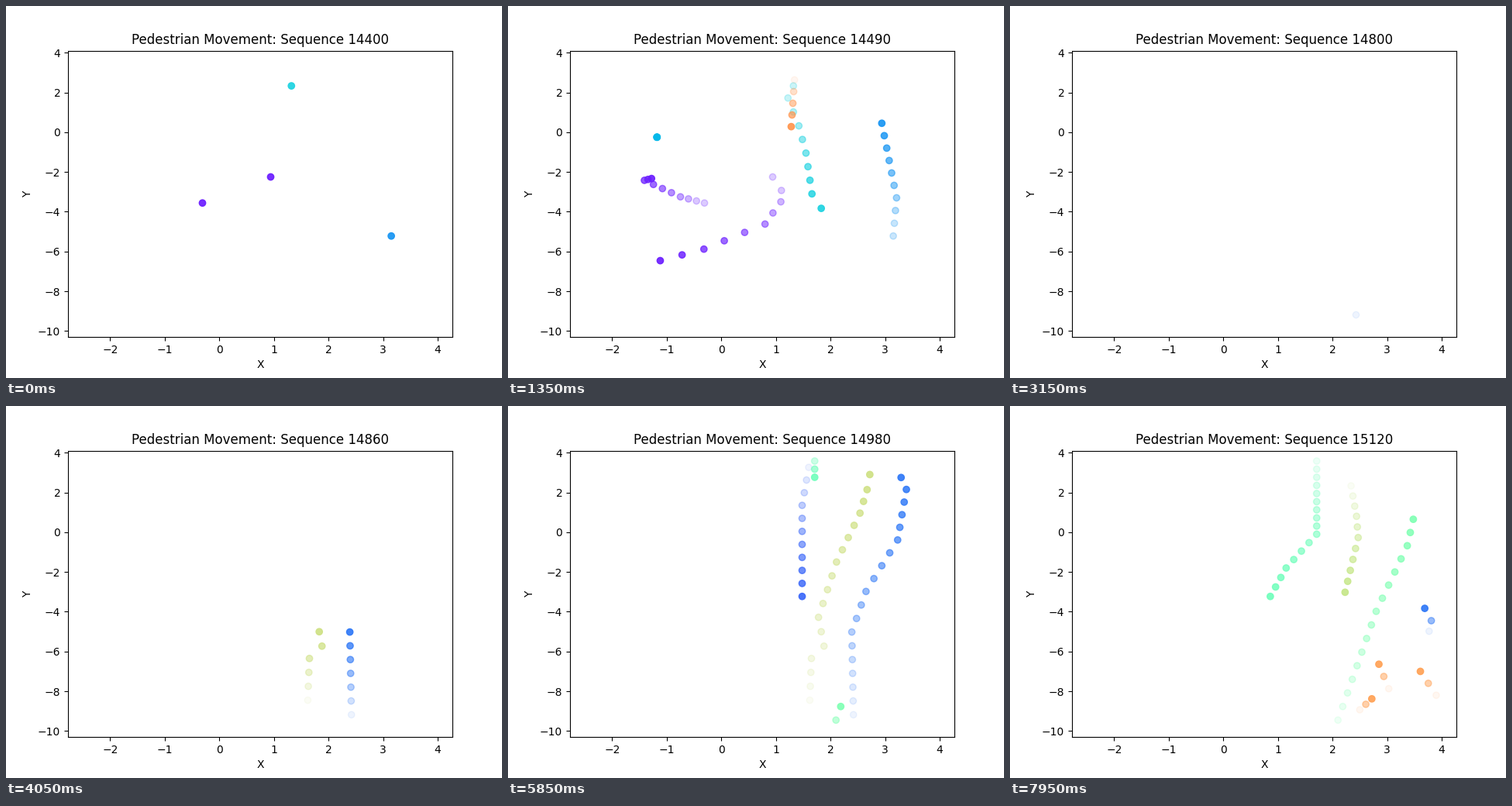
A matplotlib script for the animation above (8 s loop, 640 by 480 pixels).

```python
import numpy as np
import matplotlib.pyplot as plt
from matplotlib.animation import FuncAnimation

TICK_MS = 50
TICKS_PER_STEP = 3
TICKS = 160
GAP_STEP, GAP = 21, 190
OLDEST, NEWEST = .08, .92  # opacity along a trail

walkers = []


def walk(hue, *keys):
    """Add a walker who moves evenly between (step, x, y) key points."""
    key_steps, xs, ys = np.transpose(keys)
    steps = np.arange(key_steps[0], key_steps[-1] + 1)
    path = np.column_stack([np.interp(steps, key_steps, v) for v in (xs, ys)])
    walkers.append((plt.cm.rainbow(hue), steps, path))


# First group: already standing in place before the loop begins
walk(.04, (-1, -.31, -3.56), (0, -.31, -3.56), (3, -.75, -3.25),
     (7, -1.41, -2.42), (9, -1.28, -2.33), (12, -1.3, -2.25))
walk(.04, (-1, .94, -2.25), (0, .94, -2.25), (1, 1.1, -2.93), (2, 1.09, -3.5),
     (4, .8, -4.62), (7, -.32, -5.88), (9, -1.12, -6.46), (13, -2.7, -8.05))
walk(.2, (-1, 3.15, -5.22), (0, 3.15, -5.22), (3, 3.21, -3.3),
     (9, 2.94, .45), (14, 2.96, 3.6))
walk(.31, (-1, 1.32, 2.33), (0, 1.32, 2.33), (1, 1.22, 1.72), (3, 1.42, .32),
     (5, 1.55, -1.05), (8, 1.66, -3.1), (9, 1.83, -3.83), (17, 2.13, -9.1))
walk(.26, (5, -1.18, -.25), (20, -1.18, -.25))
walk(.8, (5, 1.34, 2.63), (9, 1.28, .28), (20, 1.49, -6.55))

# Second group
walk(.16, (21, 2.42, -9.18), (27, 2.39, -5.02), (30, 2.65, -2.98),
     (34, 3.23, -.39), (38, 3.39, 2.15), (41, 3.1, 3.95))
walk(.655, (22, 1.62, -8.45), (25, 1.65, -6.35), (26, 1.88, -5.73),
     (28, 1.78, -4.28), (32, 2.11, -1.5), (36, 2.54, .96),
     (38, 2.67, 2.14), (40, 2.77, 3.66))
walk(.135, (29, 1.6, 3.26), (32, 1.48, 1.35), (39, 1.48, -3.23), (41, 1.4, -4.5))

# Third group: the first two enter from outside the plot
walk(.47, (36, 1.71, 4.5), (37, 1.71, 3.58), (46, 1.71, -.1),
     (50, 1.15, -1.8), (53, .86, -3.23))
walk(.5, (37, 2.0, -10.7), (38, 2.1, -9.45), (46, 2.8, -3.98),
     (51, 3.37, -.68), (53, 3.48, .65))
walk(.64, (43, 2.34, 2.33), (46, 2.44, .8), (48, 2.47, -.27), (53, 2.23, -3.02))

# Late arrivals
walk(.78, (51, 3.03, -7.87), (53, 2.85, -6.64))
walk(.78, (51, 2.5, -8.93), (53, 2.72, -8.38))
walk(.78, (51, 3.9, -8.2), (53, 3.61, -7.0))
walk(.16, (51, 3.77, -4.98), (52, 3.81, -4.45), (53, 3.69, -3.83))

fig, ax = plt.subplots(figsize=(6.4, 4.8), dpi=100)
ax.set(xlim=(-2.7737, 4.27), ylim=(-10.304, 4.102), xlabel="X", ylabel="Y")
title = ax.set_title("")
dots = ax.scatter([], [])


def update(tick):
    step = tick // TICKS_PER_STEP
    points, colors = [], []
    for color, steps, path in walkers:
        if not steps[0] <= step <= steps[-1]:
            continue
        trail = path[steps <= step]
        rgba = np.tile(color, (len(trail), 1))
        rgba[:, 3] = np.linspace(OLDEST, NEWEST, len(trail))
        points.append(trail)
        colors.append(rgba)
    dots.set_offsets(np.vstack(points))
    dots.set_color(np.vstack(colors))
    sequence = 14400 + 10 * step + (GAP if step >= GAP_STEP else 0)
    title.set_text(f"Pedestrian Movement: Sequence {sequence}")
    return dots, title


anim = FuncAnimation(fig, update, frames=TICKS, interval=TICK_MS,
                     repeat=True, repeat_delay=0)
plt.show()
```
